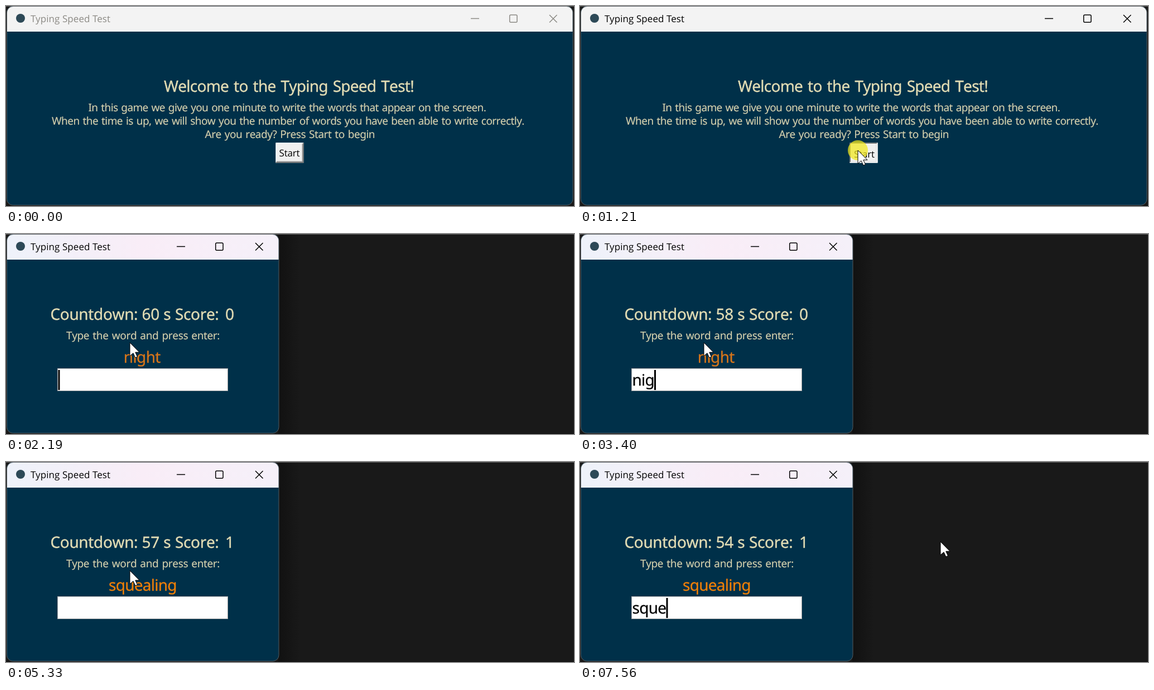
These frames come from a looping animation (1018x359 px, 8000 ms). An HTML page:

```html
<!DOCTYPE html>
<html lang="en">
<head>
<meta charset="utf-8">
<title>Typing Speed Test</title>
<style>
  html, body { margin: 0; width: 100%; height: 100%; overflow: hidden; background: #191919; }
  svg { display: block; width: 1018px; height: 359px; }
  text { font-kerning: none; text-rendering: geometricPrecision; white-space: pre; }
  .ui { font: 17px "Open Sans", "Noto Sans", sans-serif; }
  .big, .small, .word, .entry { font-family: "Noto Sans", "DejaVu Sans", sans-serif; }
  .big { font-size: 28px; fill: #e2dcb4; stroke: #e2dcb4; stroke-width: .35px; letter-spacing: -.36px; word-spacing: 2.4px; }
  .small { font-size: 19px; fill: #d4cfad; stroke: #d4cfad; stroke-width: .15px; word-spacing: 1.6px; }
  .word { font-size: 28px; stroke-width: .3px; }
  .entry { font-size: 28px; letter-spacing: -.75px; fill: #000; stroke: #000; stroke-width: .25px; }
  .controls { fill: none; stroke-width: 1.5; }
  .edge { fill: none; stroke-width: 1.5; }
</style>
</head>
<body>
<svg viewBox="0 0 1018 359">
  <defs>
    <linearGradient id="shade">
      <stop offset="0" stop-color="#111"/><stop offset="1" stop-color="#191919"/>
    </linearGradient>
    <linearGradient id="tint">
      <stop offset="0" stop-color="#eef2fa"/><stop offset=".5" stop-color="#f9edf7"/><stop offset="1" stop-color="#f5f0f9"/>
    </linearGradient>
  </defs>

  <rect width="1018" height="359" fill="#191919"/>
  <rect x="488" y="1" width="38" height="357" fill="url(#shade)"/>
  <rect width="1018" height="1" fill="#5c5c5c"/>
  <rect y="358" width="1018" height="1" fill="#101010"/>

  <rect id="frame" x="1.5" y=".5" height="357" rx="11" fill="#003049" stroke="#555b5f"/>
  <path id="bar"/>
  <circle cx="26" cy="22" r="8" fill="#2d4957"/>
  <text id="title" class="ui" x="44" y="29" style="letter-spacing:.06px">Typing Speed Test</text>
  <g id="controls" class="controls">
    <path d="M833 22.5H848M974 16L987.5 29.5M987.5 16L974 29.5"/>
    <rect x="902.7" y="16" width="13.3" height="13.3" rx="2"/>
  </g>

  <g id="welcome">
    <text class="big" x="283" y="154" style="letter-spacing:-.75px">Welcome to the Typing Speed Test!</text>
    <text class="small" x="147.5" y="189" style="letter-spacing:-.63px">In this game we give you one minute to write the words that appear on the screen.</text>
    <text class="small" x="82" y="213" style="letter-spacing:-.58px">When the time is up, we will show you the number of words you have been able to write correctly.</text>
    <text class="small" x="356.5" y="237" style="letter-spacing:-.49px">Are you ready? Press Start to begin</text>
    <rect x="483.5" y="245.5" width="50" height="36" fill="#f0f0f0"/>
    <path id="lit" class="edge" d="M484.25 281.5V246.25H533.5"/>
    <path id="inner" class="edge" d="M485 279.25H531.25V247.5"/>
    <path id="dim" class="edge" d="M483.5 280.75H532.75V245.5"/>
    <text id="start" class="ui" x="489.5" y="270" style="letter-spacing:-.2px">Start</text>
  </g>

  <g id="game">
    <text class="big" x="79.5" y="154">Countdown:</text>
    <text id="count" class="big" x="243.5" y="154"></text>
    <text class="big" x="282.3" y="154">s</text>
    <text class="big" x="303" y="154">Score:</text>
    <text id="score" class="big" x="393" y="154"></text>
    <text class="small" x="108" y="189" style="letter-spacing:-.37px">Type the word and press enter:</text>
    <text id="word" class="word" y="231"></text>
    <rect x="92.5" y="241.5" width="305" height="40" fill="#fff" stroke="#9a9c9e"/>
    <text id="typed" class="entry" x="93.5" y="272"></text>
    <rect id="caret" y="244" width="3" height="36"/>
  </g>

  <circle id="halo" r="18" fill="#f2e81c" opacity=".72"/>
  <g id="pointer">
    <path id="arrow" d="M0 0V24L6 18.8L9.8 27L13.5 25.4L9.8 17.3H17Z" fill="#fff" stroke="#000"/>
    <path id="resize" d="M-17 0L-9 -7V-1.5H9V-7L17 0L9 7V1.5H-9V7Z" fill="#fff" stroke="#000" stroke-width=".5"/>
    <path id="beam" d="M-4 -12H4M0 -12V12M-4 12H4" fill="none" stroke="#000" stroke-width="1.5"/>
  </g>
</svg>
<script>
const LOOP = 8000, STEP = 68, OPEN = 1280, CLICK = 1010, ENTER = 4800;
const el = {};
document.querySelectorAll('svg [id]').forEach(e => el[e.id] = e);

// [time, seconds left]
const counts = [[0, 60], [2330, 59], [3400, 58], [4410, 57], [5400, 56], [6410, 55], [7420, 54]];

// [time, entry text, caret on]
const edits = [
  [0, '', 0], [1980, '', 1], [2600, '', 0], [2860, '', 1],
  [3200, 'n', 1], [3270, 'ni', 1], [3400, 'nig', 1], [3470, 'nigh', 1], [3810, 'nigh', 0],
  [4140, 'night', 1], [4410, 'night', 0], [4670, 'night', 1], [ENTER, '', 1], [5330, '', 0],
  [5600, 's', 1], [6130, 's', 0], [6410, 's', 1], [6880, 'sq', 1], [7150, 'sq', 0],
  [7420, 'sq', 1], [7490, 'squ', 1], [7560, 'sque', 1]
];
const caretX = { '': 93.5, n: 109, ni: 116, nig: 133, nigh: 149, night: 158, s: 106, sq: 122, squ: 139, sque: 154.5 };

// [time, steps, start, control, end]
const moves = [
  [140, 8, [868, 336], [320, 190], [488, 262]],
  [820, 1, [488, 262], [488, 262], [487, 262]],
  [CLICK, 3, [487, 262], [493, 260], [498, 259]],
  [OPEN, 1, [497, 259], [497, 259], [497, 259]],
  [1420, 6, [465, 260], [340, 262], [232, 266]],
  [1980, 4, [232, 266], [226, 235], [222, 195]],
  [6200, 7, [232, 193], [440, 165], [646, 143]]
];

const at = (list, t) => list.filter(row => row[0] <= t).pop();
const show = (e, on) => e.setAttribute('display', on ? 'inline' : 'none');
const set = (e, attrs) => { for (const k in attrs) e.setAttribute(k, attrs[k]); };
const write = (e, s) => { if (e.textContent !== String(s)) e.textContent = s; };

function pointerAt(t) {
  const move = at(moves, t);
  if (!move) return null;
  const [t0, n, a, b, c] = move;
  const k = Math.min(n - 1, Math.floor((t - t0) / STEP));
  const p = n > 1 ? k / (n - 1) : 1;
  const u = p * p * (3 - 2 * p), v = 1 - u;
  return a.map((q, i) => v * v * q + 2 * u * v * b[i] + u * u * c[i]);
}

function drawWindow(t) {
  const open = t >= OPEN, right = open ? 489 : 1016;
  const ink = t >= CLICK ? '#000' : '#8c8a85';
  set(el.frame, { width: right - 1.5 });
  set(el.bar, {
    d: `M2 46V12a11 11 0 0 1 11-11H${right - 11.5}a11 11 0 0 1 11 11V46Z`,
    fill: t < OPEN ? '#f3f3f3' : t < OPEN + 70 ? '#f4f2f5' : 'url(#tint)'
  });
  set(el.title, { fill: ink });
  set(el.controls, { stroke: ink, transform: `translate(${right - 1016} 0)` });
  show(el.welcome, !open);
  show(el.game, open);
}

function drawButton(down) {
  set(el.lit, { stroke: down ? '#696969' : '#fff' });
  set(el.inner, { stroke: down ? '#e3e3e3' : '#a0a0a0' });
  set(el.dim, { stroke: down ? '#fff' : '#696969' });
  set(el.start, { transform: down ? 'translate(1.5 1.5)' : '' });
}

function drawGame(t) {
  const won = t >= ENTER, [, text, on] = at(edits, t);
  const color = won ? '#ee7f08' : '#d8761a';
  write(el.count, at(counts, t)[1]);
  write(el.score, won ? 1 : 0);
  write(el.word, won ? 'squealing' : 'night');
  set(el.word, {
    x: won ? 184 : 210.7,
    fill: color,
    stroke: color,
    'letter-spacing': won ? -.75 : -.6
  });
  write(el.typed, text);
  set(el.caret, { x: caretX[text] });
  show(el.caret, on);
}

function drawPointer(t) {
  const pos = pointerAt(t);
  const pressed = (t >= CLICK && t < OPEN) || (t >= 1840 && t < 1980);
  show(el.pointer, pos);
  show(el.halo, pressed);
  if (!pos) return;
  const [x, y] = pos;
  const sizing = t >= OPEN && t < 1420;
  const inEntry = t >= 1420 && x > 92 && x < 398 && y > 241 && y < 282;
  set(el.pointer, { transform: `translate(${x} ${y})` });
  set(el.halo, { cx: x, cy: y });
  show(el.resize, sizing);
  show(el.beam, inEntry);
  show(el.arrow, !sizing && !inEntry);
}

const begin = performance.now();
function draw() {
  const t = (performance.now() - begin) % LOOP;
  drawWindow(t);
  drawButton(t >= CLICK && t < OPEN);
  drawGame(t);
  drawPointer(t);
  requestAnimationFrame(draw);
}
draw();
</script>
</body>
</html>
```
